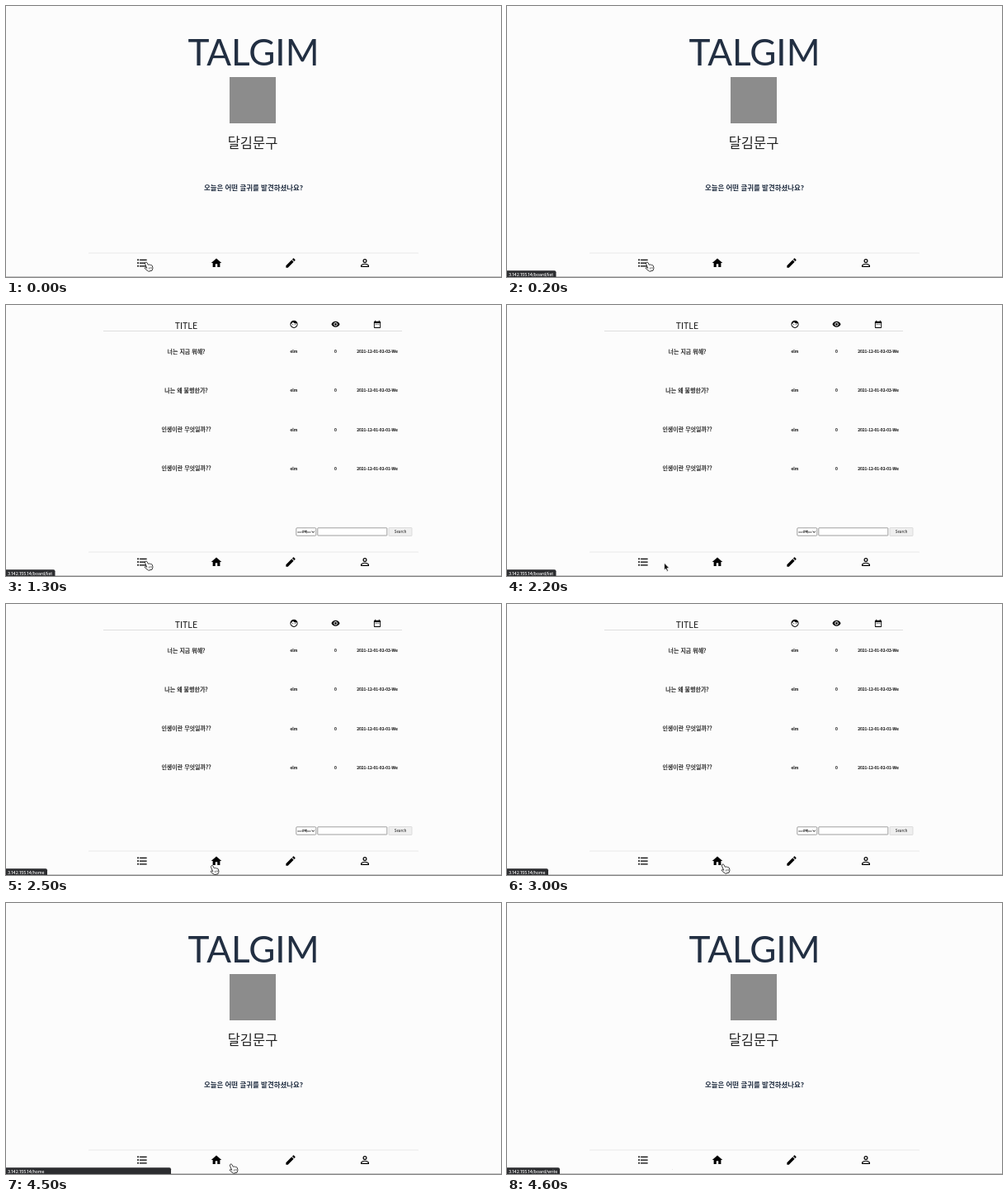
Recreate the animation shown at these times as an HTML page. Size 600 by 328 pixels, loop 5 s.

```html
<!DOCTYPE html>
<html lang="ko">
<head>
<meta charset="utf-8">
<style>
  html, body { margin: 0; width: 100%; height: 100%; overflow: hidden; background: #fcfcfc; }
  svg { display: block; width: 600px; height: 328px; }
  text { font-family: "Noto Sans CJK KR", "Noto Sans CJK", "Noto Sans", sans-serif; text-anchor: middle; fill: #111; }
  #home text { fill: #222f42; }
  #home .name { font-family: Lato, "Noto Sans", sans-serif; }
  #home .sub { fill: #222; }
  #rows text { stroke: #111; stroke-width: .2; }
  #status text { font-family: Inter, "Noto Sans", sans-serif; font-size: 5.15px; font-weight: 500; text-anchor: start; fill: #fff; }
</style>
</head>
<body>
<svg viewBox="0 0 600 328">
  <rect width="600" height="328" fill="#fcfcfc"/>
  <path d="M0 327.5H600" stroke="#c6c6c6"/>
  <path d="M100 299H500" stroke="#e9e9e9"/>
  <g id="nav"></g>

  <g id="home">
    <text class="name" x="300" y="72" font-size="44">TALGIM</text>
    <rect x="271" y="86" width="56" height="56" fill="#8c8c8c"/>
    <text class="sub" x="299" y="171.5" font-size="16.5" font-weight="300">달김문구</text>
    <text x="300" y="222.7" font-size="8.45" font-weight="700">오늘은 어떤 글귀를 발견하셨나요?</text>
  </g>

  <g id="board">
    <text x="218.5" y="29" font-size="10.5">TITLE</text>
    <path d="M118 31.5H480" stroke="#dedede"/>
    <g id="head"></g>
    <g id="rows"></g>
    <g fill="#fff" stroke="#777" stroke-width=".7">
      <rect x="351.8" y="269.8" width="24" height="9.4" rx="1"/>
      <rect x="377.8" y="269.8" width="84" height="9.2" rx=".5"/>
      <rect x="464" y="269.6" width="28" height="9.8" rx=".5" fill="#efefef" stroke="#d2d2d2"/>
    </g>
    <text x="361.5" y="276" font-size="3.9" font-weight="700">==선택==</text>
    <path d="M370.6 273.7l1.6 1.8 1.6-1.8" fill="none" stroke="#111" stroke-width=".9"/>
    <text x="478" y="276.2" font-size="4.6">Search</text>
  </g>

  <g id="status">
    <path id="bar" fill="#2c2d30"/>
    <text id="url" x="2" y="326.5"></text>
  </g>

  <g id="cursor" stroke="#111" stroke-width=".8" stroke-linejoin="round" fill="#fff">
    <g id="hand" transform="scale(1.1 1)">
      <path d="M-3.6-4.8c.8-.6 1.5 0 1.8.7l1.2 2.4c.6-.5 1.2-.3 1.5.1.5-.4 1.2-.2 1.4.3.6-.3 1.3 0 1.5.6l.6 2.2c.2 1 .1 1.6-.4 2.4l-.3 1.2-4 1.2-.7-.9c-1-.5-2.2-1.4-3.2-2.6-.6-.8.3-1.5 1-1.1l1.1.6-2-5.2c-.2-.7 0-1.3.5-1.9z"/>
      <path d="M-.1 1.6l.7 2M1.3 1.2l.7 2M2.7.9l.6 1.9" stroke-width=".5"/>
    </g>
    <path id="arrow" d="M-3-5v9l2-1.8 1.4 3.2 1.6-.7-1.4-3.1H3.4z" fill="#111" stroke="#fff"/>
  </g>
</svg>
<script>
const $ = id => document.getElementById(id);

// Icons on a 24-unit grid
const icons = {
  list: 'M7 5h14v2H7zM7 11h14v2H7zM7 17h14v2H7z' + [6, 12, 18].map(y => `M2.5 ${y}a1.5 1.5 0 1 0 3 0 1.5 1.5 0 0 0-3 0z`).join(''),
  house: 'M10 20v-6h4v6h5v-8h3L12 3 2 12h3v8z',
  pencil: 'M3 17.25V21h3.75L17.81 9.94l-3.75-3.75zM20.71 7.04c.39-.39.39-1.02 0-1.41l-2.34-2.34c-.39-.39-1.02-.39-1.41 0l-1.83 1.83 3.75 3.75z',
  person: 'M12 4a4 4 0 1 0 0 8 4 4 0 0 0 0-8zm0 1.9a2.1 2.1 0 1 1 0 4.2 2.1 2.1 0 0 1 0-4.2zM12 13c-2.67 0-8 1.34-8 4v3h16v-3c0-2.66-5.33-4-8-4zm0 1.9c2.97 0 6.1 1.46 6.1 2.1v1.1H5.9V17c0-.64 3.13-2.1 6.1-2.1z',
  face: 'M12 2a10 10 0 1 0 0 20 10 10 0 0 0 0-20zM4.05 11.14c2.36-1.05 4.23-2.98 5.21-5.37 2.4 3.5 6.4 4.8 10.41 3.97A8 8 0 1 1 4.05 11.14zM7.75 13a1.25 1.25 0 1 0 2.5 0 1.25 1.25 0 0 0-2.5 0zM13.75 13a1.25 1.25 0 1 0 2.5 0 1.25 1.25 0 0 0-2.5 0z',
  eye: 'M12 4.5C7 4.5 2.7 7.6 1 12c1.7 4.4 6 7.5 11 7.5s9.3-3.1 11-7.5c-1.7-4.4-6-7.5-11-7.5zM12 7a5 5 0 1 1 0 10 5 5 0 0 1 0-10zM12 9a3 3 0 1 0 0 6 3 3 0 0 0 0-6z',
  calendar: 'M7 11h2v2H7zM11 11h2v2h-2zM15 11h2v2h-2zM19 4h-1V2h-2v2H8V2H6v2H5a2 2 0 0 0-2 2v14a2 2 0 0 0 2 2h14a2 2 0 0 0 2-2V6a2 2 0 0 0-2-2zM5 9h14v11H5z'
};
const icon = (name, x, y, size) =>
  `<path d="${icons[name]}" fill-rule="evenodd" transform="translate(${x} ${y}) scale(${size / 24}) translate(-12 -12)"/>`;
const label = (x, y, size, text) => `<text x="${x}" y="${y}" font-size="${size}">${text}</text>`;

$('nav').innerHTML = ['list', 'house', 'pencil', 'person'].map((n, i) => icon(n, 165 + 90 * i, 311, 15)).join('');
$('head').innerHTML = ['face', 'eye', 'calendar'].map((n, i) => icon(n, 349 + 50.5 * i, 23.3, 11)).join('');
$('rows').innerHTML = ['너는 지금 뭐해?', '나는 왜 불행한가?', '인생이란 무엇일까??', '인생이란 무엇일까??'].map((title, i) => {
  const y = 58.3 + 47.1 * i;
  return label(218.5, y + .5, 7, title) + label(349, y, 5, 'elm') + label(399.5, y, 5, '0') +
    label(450, y, 5.05, `2021-12-01-02-0${i < 2 ? 3 : 1}-We`);
}).join('');

// Pointer positions: time, x, y
const track = [[2100, 173, 315], [2300, 214, 319], [2500, 253, 321.5], [2700, 257.5, 321], [3000, 265, 320], [4400, 265, 320], [4500, 276, 321]];
function pointer(t) {
  const next = track.findIndex(p => p[0] > t);
  if (next === 0) return track[0].slice(1);
  if (next < 0) return track[track.length - 1].slice(1);
  const [t0, x0, y0] = track[next - 1], [t1, x1, y1] = track[next];
  const k = (t - t0) / (t1 - t0);
  return [x0 + (x1 - x0) * k, y0 + (y1 - y0) * k];
}

const show = (id, on) => $(id).style.display = on ? '' : 'none';

function draw(now) {
  const t = Math.floor(now % 5000 / 100) * 100;
  const onBoard = t >= 900 && t < 3300;
  show('home', !onBoard);
  show('board', onBoard);
  show('rows', t >= 1300);

  const [page, width] = t < 2400 ? ['board/list', 59.5] : t < 3300 ? ['home', 50] : t < 4600 ? ['home', 200] : ['board/write', 64];
  $('url').textContent = '3.142.155.14/' + page;
  $('bar').setAttribute('d', `M0 320.3H${width - 2}q2 0 2 2V328H0z`);
  $('status').style.opacity = Math.min(1, t / 200);

  const [x, y] = pointer(t), between = x > 180 && x < 245;
  $('cursor').setAttribute('transform', `translate(${x} ${y})`);
  show('cursor', t < 4600);
  show('hand', !between);
  show('arrow', between);
}

const start = performance.now();
(function loop() {
  draw(performance.now() - start);
  requestAnimationFrame(loop);
})();
</script>
</body>
</html>
```
